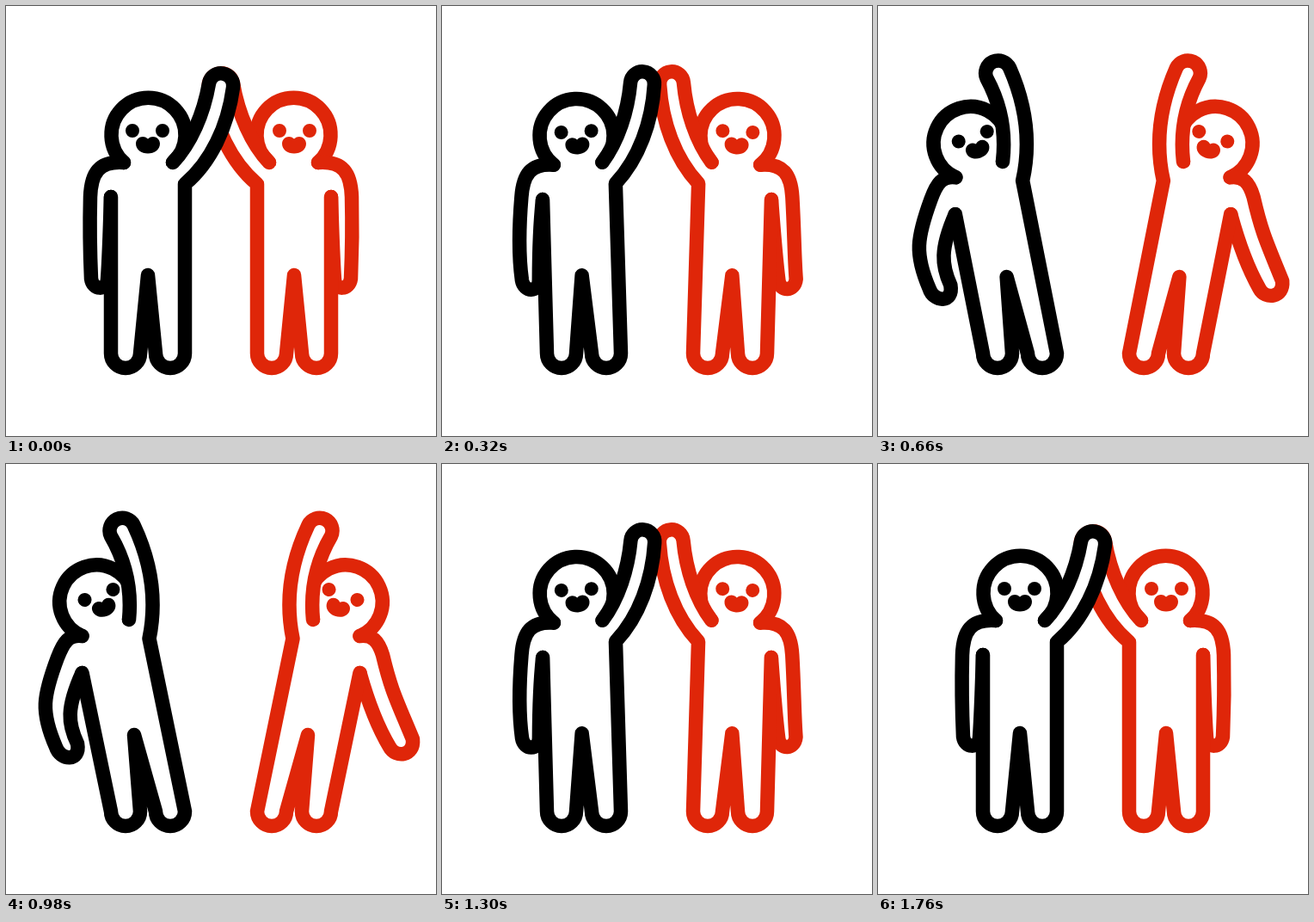
These frames come from a looping animation (500x500 px, 2.4 s). An HTML page:

```html
<!DOCTYPE html>
<html lang="en">
<head>
<meta charset="utf-8">
<title>High five</title>
<style>
html, body { margin: 0; width: 100%; height: 100%; overflow: hidden; background: #fff; }
svg { display: block; width: 100vw; height: 100vh; }
path { fill: #fff; stroke: currentColor; stroke-width: 16.5; stroke-linecap: round; stroke-linejoin: round; }
.face * { fill: currentColor; stroke: none; }
#spark { stroke-width: 5; }
</style>
</head>
<body>
<svg viewBox="0 0 500 500">
  <g id="right" color="#df2609" transform="matrix(-1 0 0 1 500 0)"></g>
  <g id="left" color="#000"></g>
  <path id="spark"/>
</svg>
<script>
const LOOP = 2400;

// Each part: upright outline, leaning outline
const head = ['M137 182A43 43 0 1 1 194 182', 'M88.5 200A43 43 0 1 1 143 181'];
const torso = [
  'M122 222L122 404A1 1 0 0 0 156 404L165 313L174 404A1 1 0 0 0 208 404L208 207' +
    'C238 182 258 140 264 95A1 1 0 0 0 236 90C230 125 215 160 194 182',
  'M88.5 243L122 404A1 1 0 0 0 156 404L149 315L174 404A1 1 0 0 0 208 404L166.5 203' +
    'C177 152 165 106 148.5 71A1 1 0 0 0 122 84C136 108 147 140 143 181'
];
const armUpright = 'M137 182C108 180 99 194 98 222C97 262 98 295 99 317' +
  'C101 331 117 331 118 318C120 290 121 255 122 222';
const armBent = 'M88.5 200C73 198 67 207 60 225C43 270 40 288 58 329' +
  'C63 345 87 347 83 325C72 302 70 284 88.5 243';
const armSwung = 'M88.5 200C74 198 67 206 62 222C52 264 46 274 27 320' +
  'C25 340 47 342 54 329C66 309 77 284 88.5 243';

// Lean amount over time
const keys = [[0, 0], [180, .03], [320, .147], [500, .718], [540, .83], [660, .96],
  [830, 1.025], [980, 1], [1080, .925], [1300, .147], [1420, .04], [1620, 0], [LOOP, 0]];
const secant = i => (keys[i + 1][1] - keys[i][1]) / (keys[i + 1][0] - keys[i][0]);

function slope(i) {
  if (i === 0 || i === keys.length - 1) return 0;
  const a = secant(i - 1), b = secant(i);
  return a * b > 0 ? 2 * a * b / (a + b) : 0;
}

// Monotone cubic through the keys
function leanAt(t) {
  let i = 0;
  while (t >= keys[i + 1][0]) i++;
  const [t0, v0] = keys[i], [t1, v1] = keys[i + 1];
  const h = t1 - t0, u = (t - t0) / h, w = 1 - u;
  return w * w * ((1 + 2 * u) * v0 + u * h * slope(i)) +
         u * u * ((1 + 2 * w) * v1 - w * h * slope(i + 1));
}

const lerp = (a, b, p) => a + (b - a) * p;

function morph([from, to], p) {
  const ends = to.match(/[\d.]+/g);
  let i = 0;
  return from.replace(/[\d.]+/g, n => +lerp(+n, +ends[i++], p).toFixed(2));
}

function makeFigure(id, armEnd) {
  const group = document.getElementById(id);
  group.innerHTML = '<path/><path/><path/><g class="face">' +
    '<circle cx="-17.5" r="8"/><circle cx="17.5" r="8"/>' +
    '<path d="M.5 9.5C6 4 14.5 8 14.5 15S8 26.5 .5 26.5S-13.5 22 -13.5 15S-5 4 .5 9.5Z"/></g>';
  const parts = [head, [armUpright, armEnd], torso];
  const face = group.lastChild;
  return p => {
    parts.forEach((part, i) => group.children[i].setAttribute('d', morph(part, p)));
    face.setAttribute('transform',
      `translate(${lerp(164.5, 108, p)} ${lerp(145, 152, p)}) rotate(${-20 * p})`);
  };
}

const figures = [makeFigure('left', armBent), makeFigure('right', armSwung)];
const spark = document.getElementById('spark');

function drawSpark(t) {
  const u = (t - 1540) / 220;
  if (u <= 0 || u >= 1) return spark.setAttribute('d', '');
  const outer = 22 + 25 * (1 - (1 - u) ** 3), inner = lerp(22, 47, u * u);
  const point = (r, deg) => {
    const a = deg * Math.PI / 180;
    return `${262 + r * Math.cos(a)} ${85 + r * Math.sin(a)}`;
  };
  spark.setAttribute('d', [-80, -45, -10].map(a => `M${point(inner, a)}L${point(outer, a)}`).join(''));
}

function draw() {
  const t = performance.now() % LOOP;
  const p = leanAt(t);
  figures.forEach(pose => pose(p));
  drawSpark(t);
  requestAnimationFrame(draw);
}
draw();
</script>
</body>
</html>
```
